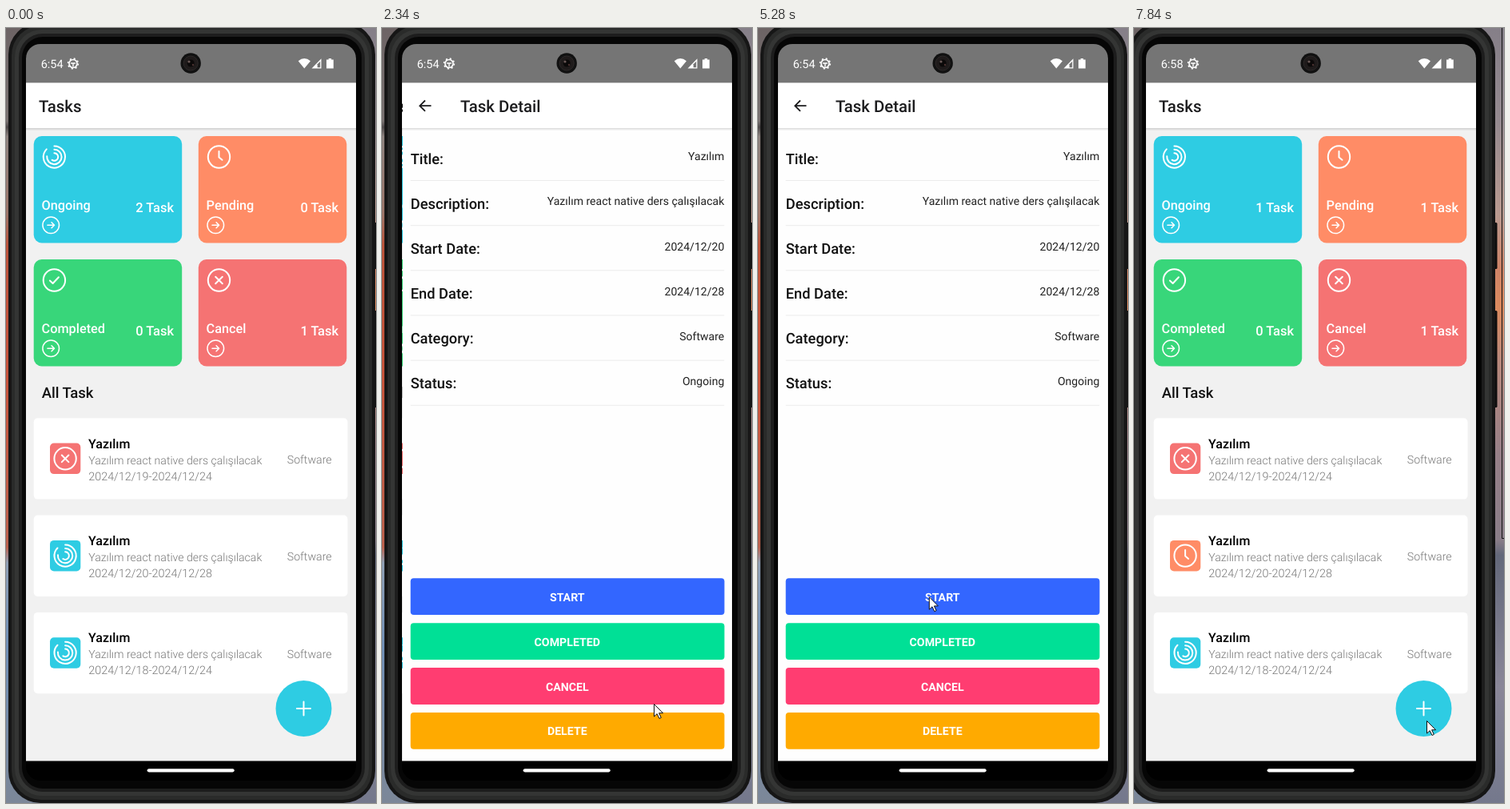
Write an HTML page that moves like this. It is 463 by 968 pixels and loops after 8000 ms.

```html
<!DOCTYPE html>
<html lang="tr">
<head>
<meta charset="utf-8">
<title>Tasks</title>
<style>
html, body { margin: 0; width: 100%; height: 100%; overflow: hidden; background: #111; }
svg { display: block; width: 463px; height: 968px; font-family: Roboto, "Noto Sans", sans-serif; text-rendering: geometricPrecision; }
.line { fill: none; stroke: #fff; stroke-linecap: round; stroke-linejoin: round; }
</style>
</head>
<body>
<svg id="stage" viewBox="0 0 463 968"></svg>
<script>
const LOOP = 8000, CUT = 6650, OPEN = 2023, SLIDE = 450, SHIFT = 41.3;
const BLUE = '#2ecce3', ORANGE = '#ff8c66', GREEN = '#38d67a', RED = '#f57373';

// ---- drawing helpers
const rect = (x, y, w, h, fill, r = 0, extra = '') =>
  `<rect x="${x}" y="${y}" width="${w}" height="${h}" rx="${r}" fill="${fill}" ${extra}/>`;
const text = (s, x, y, size, weight, fill, anchor = 'start') =>
  `<text x="${x}" y="${y}" font-size="${size}" font-weight="${weight}" fill="${fill}" text-anchor="${anchor}">${s}</text>`;
const ring = (x, y, r, w) => `<circle class="line" cx="${x}" cy="${y}" r="${r}" stroke-width="${w}"/>`;
const line = (d, w, x = 0, y = 0) =>
  `<path class="line" d="${d}" stroke-width="${w}" transform="translate(${x} ${y})"/>`;
const vGradient = (id, stops) =>
  `<linearGradient id="${id}" x1="0" y1="0" x2="0" y2="1">` +
  stops.map(([o, c]) => `<stop offset="${o}" stop-color="${c}"/>`).join('') + '</linearGradient>';

// arc clockwise from the top
function arc(r, deg) {
  const a = deg * Math.PI / 180;
  return `M0 ${-r}A${r} ${r} 0 ${deg > 180 ? 1 : 0} 1 ${(r * Math.sin(a)).toFixed(2)} ${(-r * Math.cos(a)).toFixed(2)}`;
}

const icons = {
  ongoing: (x, y) => line(arc(13.6, 315) + arc(9.2, 275) + arc(4.8, 215), 2, x, y),
  pending: (x, y) => ring(x, y, 13.7, 2) + line('M0 -7V0.5L4 3.8', 2, x, y),
  done: (x, y) => ring(x, y, 13.7, 2) + line('M-5.5 0.5L-1.8 4L5.5 -3.8', 2, x, y),
  cancel: (x, y) => ring(x, y, 13.7, 2) + line('M-4.3 -4.3L4.3 4.3M4.3 -4.3L-4.3 4.3', 2, x, y)
};
const tint = { ongoing: BLUE, pending: ORANGE, done: GREEN, cancel: RED };

// ---- screens
const header = (title, x) =>
  rect(25, 125, 413, 3.5, 'url(#shade)') + rect(25, 68, 413, 57, '#fff') +
  text(title, x, 104.7, 20.4, 500, '#1c1c1e');

function card(x, y, kind, label, count) {
  return rect(x, y, 185.5, 133.5, tint[kind], 10) +
    icons[kind](x + 25.7, y + 26) +
    text(label, x + 9.8, y + 92.3, 16.3, 500, '#fff') +
    text(count + ' Task', x + 175.4, y + 94.8, 16.5, 500, '#fff', 'end') +
    ring(x + 21.5, y + 111.3, 10.3, 1.5) +
    line('M-4.3 0H4.3M0.8 -3.5L4.3 0L0.8 3.5', 1.5, x + 21.5, y + 111.3);
}

function item(i, kind, dates) {
  const y = 487.3 + i * 121.3;
  return rect(34.7, y, 392.8, 101.3, '#fff', 5) +
    rect(55, y + 31.3, 38.3, 38.5, tint[kind], 5) +
    icons[kind](74.1, y + 50.5) +
    text('Yazılım', 103, y + 37.5, 16, 500, '#000') +
    text('Yazılım react native ders çalışılacak', 103.2, y + 57.5, 14.1, 300, '#777') +
    text(dates, 103.2, y + 77.2, 14.4, 300, '#777') +
    text('Software', 407.7, y + 56.6, 14.2, 300, '#777', 'end');
}

function list(id, ongoing, pending, second) {
  return `<g id="${id}">` + rect(25, 68, 413, 847, '#f1f1f1') + header('Tasks', 41) +
    card(34.7, 135, 'ongoing', 'Ongoing', ongoing) +
    card(240.8, 135, 'pending', 'Pending', pending) +
    card(34.7, 289, 'done', 'Completed', 0) +
    card(240.8, 289, 'cancel', 'Cancel', 1) +
    text('All Task', 44.7, 462, 18.5, 500, '#111') +
    item(0, 'cancel', '2024/12/19-2024/12/24') +
    item(1, second, '2024/12/20-2024/12/28') +
    item(2, 'ongoing', '2024/12/18-2024/12/24') +
    `<circle cx="372.5" cy="850" r="35" fill="${BLUE}"/>` +
    line('M-8.5 0H8.5M0 -8.5V8.5', 2, 372.5, 850) + '</g>';
}

function detail() {
  const rows = [['Title:', 'Yazılım'], ['Description:', 'Yazılım react native ders çalışılacak'],
    ['Start Date:', '2024/12/20'], ['End Date:', '2024/12/28'],
    ['Category:', 'Software'], ['Status:', 'Ongoing']];
  const buttons = [['START', '#3366ff'], ['COMPLETED', '#00e096'], ['CANCEL', '#ff3d71'], ['DELETE', '#ffaa00']];
  return '<g id="detail">' + rect(25, 68, 413, 847, '#fefefe') + header('Task Detail', 97) +
    '<path d="M60.5 97.2H46.5M53 90.5L46.3 97.2L53 103.9" fill="none" stroke="#1c1c1e" stroke-width="1.8"/>' +
    rows.map(([name, value], i) => {
      const y = i * 56.15;
      return text(name, 34.7, 169.5 + y, 18.3, 500, '#111') +
        text(value, 427.3, 165.3 + y, 14.05, 400, '#222', 'end') +
        rect(34.7, 190 + y, 392.6, 1, '#ebebeb');
    }).join('') +
    buttons.map(([name, fill], i) => {
      const y = 687.3 + i * 55.9;
      return rect(34.7, y, 392.8, 45.8, fill, 4, `id="b${i}"`) +
        text(name, 230.8, y + 28.4, 14.2, 700, '#fff', 'middle');
    }).join('') + '</g>';
}

const statusBar = rect(25, 20, 413, 48.4, '#757575') +
  '<text id="clock" x="43.7" y="49.8" font-size="14.5" fill="#fff"></text>' +
  ring(84, 44.5, 5, 1.7) +
  '<circle class="line" cx="84" cy="44.5" r="6.4" stroke-width="1.6" style="stroke-dasharray:2 3.03;stroke-linecap:butt"/>' +
  line('M-2.5 -0.5H2.5M0 0V3.5', 1.4, 84, 44.5) +
  '<path d="M365.7 41.2Q373.3 35 381 41.2L373.3 50.6ZM401 39.6h2.7v-1.6h3.4v1.6h2.7v11h-8.8Z" fill="#fff"/>' +
  '<path d="M382.5 50.5L394.5 38.3V50.5Z" fill="#fff"/><path id="gap" d="M389.7 45.2L393.2 41.7V49.3H389.7Z" fill="#757575"/>';

const camera = '<circle cx="231.2" cy="44" r="12.7" fill="#111"/>' +
  '<circle cx="231.2" cy="44" r="9" fill="#1f1b1b" stroke="#2d2929"/>' +
  '<circle cx="231.2" cy="44" r="4.5" fill="#0b0909"/>' +
  '<circle cx="229" cy="42" r="1.6" fill="#6b5a58"/><circle cx="234" cy="46" r="1.2" fill="#4a3230"/>';

const body =
  rect(460, 243, 4.5, 58, '#0d0d0d', 1.5) + rect(460, 353, 4.5, 121, '#0d0d0d', 1.5) +
  rect(3, -7, 459, 975, '#161616', 40) +
  rect(7, -3, 451, 967, '#2a2b2a', 37) +
  rect(11, 2, 443, 957, '#343534', 34) +
  rect(16, 7, 433, 947, '#1d1d1d', 30) +
  rect(20, 11, 425, 939, '#060606', 26);

const stage = document.getElementById('stage');
stage.innerHTML = '<defs>' +
  '<clipPath id="glass"><rect x="25" y="20" width="413" height="920" rx="18"/></clipPath>' +
  '<clipPath id="view"><rect x="25" y="68" width="413" height="847.4"/></clipPath>' +
  vGradient('shade', [[0, 'rgba(0,0,0,.14)'], [1, 'rgba(0,0,0,0)']]) +
  vGradient('skyLeft', [[0, '#6d6465'], [.12, '#77706f'], [.128, '#4c4748'], [.14, '#8b817d'], [.24, '#9a7468'],
    [.28, '#b9533a'], [.45, '#c5533a'], [.67, '#b8604c'], [.69, '#8d9db2'], [.8, '#6f8eb4'], [1, '#7c8798']]) +
  vGradient('skyRight', [[0, '#857f88'], [.12, '#958a90'], [.24, '#b99a90'], [.31, '#cf8468'], [.36, '#dc8a5e'],
    [.43, '#b9897c'], [.55, '#978088'], [.66, '#8a7d88'], [.68, '#63687a'], [.85, '#8a8798'], [1, '#74788c']]) +
  '</defs>' +
  rect(0, 0, 232, 968, 'url(#skyLeft)') + rect(231, 0, 232, 968, 'url(#skyRight)') +
  '<path id="edge" d="M460.5 0V637.5H463" fill="none" stroke="#111"/>' +
  '<g id="phone">' + body + '<g clip-path="url(#glass)">' + rect(25, 20, 413, 920, '#000') +
  '<g clip-path="url(#view)">' + rect(25, 68, 413, 848, '#f3f3f3') +
  list('before', 2, 0, 'ongoing') + list('after', 1, 1, 'pending') + detail() + '</g>' +
  statusBar + camera + rect(176.7, 925.2, 109, 4.2, '#fff', 2.1) + '</g></g>' +
  '<g id="cursor"><path d="M.5 .5V16L4.2 12.6L7 18.5L9.3 17.4L6.6 11.7H11.6Z" fill="#fff" stroke="#111"/>' +
  '<circle id="halo" r="15" fill="rgb(252,246,8)" fill-opacity=".53"/></g>';

const el = id => document.getElementById(id);
const show = (id, on) => { el(id).style.display = on ? '' : 'none'; };
const shift = (id, x, y = 0) => el(id).setAttribute('transform', `translate(${x} ${y})`);

// ---- motion
const clamp = v => Math.max(0, Math.min(1, v));

// fast-out, extra-slow-in: two joined cubic curves
function slide(x) {
  if (x <= 0 || x >= 1) return clamp(x);
  const [px, py] = x < 1 / 6 ? [[0, .05, .1333, .1667], [0, 0, .06, .4]] : [[.1667, .2083, .25, 1], [.4, .82, 1, 1]];
  const at = (p, u) => {
    const v = 1 - u;
    return p[0] * v * v * v + 3 * p[1] * u * v * v + 3 * p[2] * u * u * v + p[3] * u * u * u;
  };
  let lo = 0, hi = 1;
  for (let i = 0; i < 24; i++) {
    const mid = (lo + hi) / 2;
    if (at(px, mid) < x) lo = mid; else hi = mid;
  }
  return at(py, lo);
}

// pointer moves as [time, x, y]
const moves = [
  [[300, 272, 852], [600, 240, 765], [900, 206, 678]],
  [[1910, 206, 678], [2090, 327, 830], [2330, 340, 844], [2510, 322, 832], [2730, 255, 764], [2840, 235, 699]],
  [[3280, 235, 699], [3900, 212, 706]],
  [[5220, 212, 706], [6020, 325, 970]],
  [[7210, 370, 939], [7510, 364, 893], [7840, 366, 865]]
];

function pointer(t) {
  const move = moves.filter(m => t >= m[0][0]).pop();
  const start = move[0][0], last = move[move.length - 1];
  if (t >= last[0]) return last.slice(1);
  const q = start + Math.floor((t - start) / 60) * 60;
  const i = move.findIndex(k => k[0] > q);
  const a = move[i - 1], b = move[i];
  const p = (q - a[0]) / (b[0] - a[0]), s = p * p * (3 - 2 * p);
  return [a[1] + (b[1] - a[1]) * s, a[2] + (b[2] - a[2]) * s];
}

function render(t) {
  const cut = t >= CUT, opening = t - OPEN, p = slide(opening / SLIDE);
  shift('phone', cut ? -10 : 0);
  show('edge', cut);
  show('gap', !cut);
  el('clock').textContent = cut ? '6:58' : '6:54';

  // screens move by whole pixels
  show('before', !cut && opening < SLIDE);
  show('after', cut);
  show('detail', !cut && opening > 50);
  shift('before', -Math.floor(SHIFT * p));
  shift('detail', Math.ceil(SHIFT * (1 - p)));
  el('detail').setAttribute('opacity', clamp((opening - 50) / 80));
  el('b0').setAttribute('fill', t >= 4710 && t < 4970 ? '#274bdb' : '#3366ff');

  const visible = (t >= 300 && t < 6020) || t >= 7210;
  show('cursor', visible);
  if (visible) shift('cursor', ...pointer(t));
  show('halo', (t >= 1530 && t < 1790) || (t >= 4650 && t < 4910));
}

const begin = performance.now();
function tick() {
  render((performance.now() - begin) % LOOP);
  requestAnimationFrame(tick);
}
tick();
</script>
</body>
</html>
```
